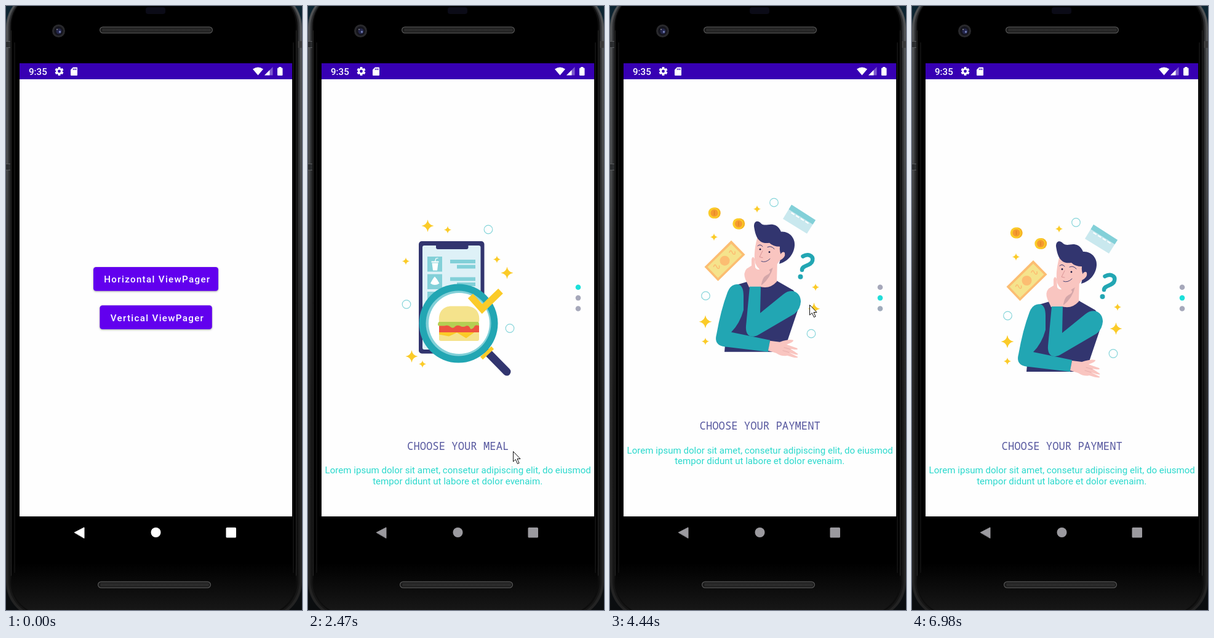
Recreate the animation shown at these times as an HTML page with a canvas. Size 481x981 px, loop 7.64 s.

```html
<!DOCTYPE html>
<html lang="en">
<head>
<meta charset="utf-8">
<title>ViewPager demo</title>
<style>
html, body { margin: 0; width: 100%; height: 100%; overflow: hidden; background: #000; }
canvas { display: block; }
</style>
</head>
<body>
<canvas id="stage" width="481" height="981"></canvas>
<script>
const ctx = document.getElementById('stage').getContext('2d');
const LOOP = 7640, PAGE = 710, OPEN = 1636, OPEN_MS = 425;
const NAVY = '#32356f', INK = '#1b1741', TEAL = '#22a6b3', AQUA = '#82d0d8', ICE = '#c6e6ec',
  GOLD = '#fbcb28', ORANGE = '#f59a2f', CREAM = '#f5e38c', SKIN = '#f9c5c0', PEACH = '#fcbd72';

// drawing helpers
const fill = (c, d) => { ctx.fillStyle = c; ctx.fill(new Path2D(d)); };
const line = (c, w, d, cap = 'round') => {
  ctx.strokeStyle = c; ctx.lineWidth = w; ctx.lineCap = cap;
  ctx.lineJoin = cap === 'round' ? 'round' : 'miter';
  ctx.stroke(new Path2D(d));
};
const rect = (c, x, y, w, h, r = 0) => {
  ctx.fillStyle = c; ctx.beginPath(); ctx.roundRect(x, y, w, h, r); ctx.fill();
};
const disc = (c, x, y, rx, ry = rx) => {
  ctx.fillStyle = c; ctx.beginPath(); ctx.ellipse(x, y, rx, ry, 0, 0, 7); ctx.fill();
};
const ring = (x, y) => {
  ctx.strokeStyle = '#86d5da'; ctx.lineWidth = 1.2;
  ctx.beginPath(); ctx.arc(x, y, 6.8, 0, 7); ctx.stroke();
};
const star = (x, y, r = 6) => {
  const k = r * 0.14;
  fill(GOLD, `M${x} ${y - r}Q${x + k} ${y - k} ${x + r} ${y}Q${x + k} ${y + k} ${x} ${y + r}` +
    `Q${x - k} ${y + k} ${x - r} ${y}Q${x - k} ${y - k} ${x} ${y - r}Z`);
};
const text = (s, x, y, font, c, align = 'center', gap = 0) => {
  ctx.font = font; ctx.fillStyle = c; ctx.textAlign = align;
  ctx.letterSpacing = gap + 'px';
  ctx.fillText(s, x, y);
  ctx.letterSpacing = '0px';
};
const shade = (y0, y1, ...colors) => {
  const g = ctx.createLinearGradient(0, y0, 0, y1);
  colors.forEach((c, i) => g.addColorStop(i / (colors.length - 1), c));
  return g;
};
const layer = (dy, fn) => { ctx.save(); ctx.translate(0, dy); fn(); ctx.restore(); };
const clip = (x, y, w, h) => { ctx.beginPath(); ctx.rect(x, y, w, h); ctx.clip(); };

// timing helpers
const clamp = v => Math.min(1, Math.max(0, v));
const bez = (a, b, c, d, u) => {
  const v = 1 - u;
  return v * v * v * a + 3 * v * v * u * b + 3 * v * u * u * c + u * u * u * d;
};
const curve = (xs, ys, x) => {
  let lo = 0, hi = 1;
  for (let i = 0; i < 24; i++) {
    const m = (lo + hi) / 2;
    if (bez(...xs, m) < x) lo = m; else hi = m;
  }
  return bez(...ys, lo);
};
const fastOut = x => curve([0, .4, .2, 1], [0, 0, 1, 1], x);
const extraSlow = x => x < 1 / 6
  ? curve([0, .05, .13333, .16667], [0, 0, .06, .4], x)
  : curve([.16667, .20833, .25, 1], [.4, .82, 1, 1], x);

const POINTER = [
  [70, 419, 964], [300, 345, 800], [560, 264, 590], [770, 242, 541], [1050, 242, 507],
  [1190, 242, 507], [1480, 350, 598], [1790, 414, 669], [1930, 410, 684], [2260, 350, 720],
  [2560, 326, 724], [2720, 314, 600], [2860, 312, 582], [3280, 312, 582], [3420, 292, 400],
  [3550, 289, 395], [4020, 305, 380], [4100, 308, 380], [4274, 322, 475], [4440, 324, 485],
  [4860, 316, 491], [4910, 315, 491], [5020, 312, 625], [5180, 312, 633], [5520, 312, 633],
  [5720, 326, 491], [5860, 332, 500], [6270, 351, 750], [6330, 351, 754], [6600, 378, 840],
  [6920, 415, 938]
];
function pointerAt(t) {
  const i = POINTER.findIndex(k => k[0] > t);
  if (i < 1) return null;
  const [t0, x0, y0] = POINTER[i - 1], [t1, x1, y1] = POINTER[i];
  const u = (t - t0) / (t1 - t0);
  return [x0 + (x1 - x0) * u, y0 + (y1 - y0) * u];
}

// press, release, settle time, then page before, at release and after
const SWIPES = [
  [2560, 2720, 377, 0, .2, 1], [3280, 3420, 377, 1, 1.25, 2], [4100, 4274, 377, 2, 1.85, 1],
  [4910, 5020, 300, 1, .8, 0], [5520, 5720, 377, 0, .2, 1]
];
function pageAt(t) {
  let pos = 0;
  for (const [press, release, ms, from, mid, to] of SWIPES) {
    if (t < press) break;
    pos = t < release
      ? from + (mid - from) * (t - press) / (release - press)
      : to + (mid - to) * (1 - clamp((t - release) / ms)) ** 5;
  }
  return pos;
}

function phoneBody() {
  rect(shade(0, 981, '#0c2431', '#0a1c27', '#0b0d0f'), 0, 0, 481, 981);
  rect(shade(0, 981, '#505254', '#47494b', '#2a2a2a', '#232323', '#232323'), 0, -25, 481, 1020, 60);
  rect(shade(0, 981, '#2c2d2f', '#2a2b2c', '#181818', '#161616'), 4, -24, 473, 1016, 58);
  rect('#0d0d0d', 7, -23, 467, 1013, 56);
  for (const y of [57, 256]) {
    rect('#5b5d5f', 0, y, 7, 11);
    rect('#2b2d2f', 0, y + 1, 7, 9);
  }
  rect('#3a3a3a', 474, 57, 7, 11);
  rect(shade(905, 981, '#000', '#171717'), 9, -22, 462, 1010, 54);
  line('#2a2a2a', 1, 'M8.5 40V925M471.5 40V925');
  line('#101010', 2, 'M14 60V920M467 60V920');

  rect('#0b0b17', 227, 2, 32, 11, 4);
  disc('#29292c', 85.5, 40.5, 10.5);
  disc('#15151d', 85.5, 40.5, 7.5);
  disc('#24264a', 86, 41, 4.5);
  disc('#7580b8', 87.5, 42, 1.7);
  disc('#8b8b95', 83, 38, 1);
  for (const [x, y] of [[152, 33.5], [149, 934.5]]) {
    rect('#565656', x, y, 184, 11, 5.5);
    rect('#1c1c1c', x + 1.2, y + 1.2, 181.6, 8.6, 4.3);
    ctx.fillStyle = '#393939';
    for (let i = 5; i < 180; i += 2) ctx.fillRect(x + i, y + 3, 1, 5);
  }
}

function statusIcons() {
  const w = '#fff';
  text('9:35', 37, 112, '500 15.1px Roboto, sans-serif', w, 'left');
  ctx.save();
  ctx.translate(86.5, 106);
  disc(w, 0, 0, 5.2);
  for (let i = 0; i < 6; i++) { ctx.rotate(Math.PI / 3); rect(w, -1.9, -7, 3.8, 4, .5); }
  disc('#3700b3', 0, 0, 2.4);
  ctx.restore();
  fill(w, 'M109 99.5H115Q116 99.5 116 100.5V112Q116 113 115 113H106Q105 113 105 112V103.5Z');
  line('#3700b3', 1.2, 'M109.5 101.5V104M111.7 101.5V104M113.8 101.5V104', 'butt');
  fill(w, 'M401 102.5Q409.5 96.5 418 102.5L409.5 112.5Z');
  fill('rgba(255,255,255,.35)', 'M420 112.5L433.5 99V112.5Z');
  fill(w, 'M420 112.5L428.5 104V112.5Z');
  rect(w, 441, 100.5, 8.5, 12.5, 1.2);
  rect(w, 443.3, 99, 4, 2);
}

function navIcons(t) {
  const k = clamp((t - 1700) / 340);
  const c = `rgb(${255 - 100 * k},${255 - 101 * k},${255 - 96 * k})`;
  fill(c, 'M111.5 855L127 847V864Z');
  line(c, 1, 'M111.5 855L127 847V864Z');
  disc(c, 243.5, 855, 8);
  rect(c, 357.5, 847, 16.5, 16.5, 1.5);
}

function windowBase() {
  rect('#000', 22, 93, 443, 788);
  rect('#3700b3', 22, 93, 443, 26);
  rect('#fefefe', 22, 119, 443, PAGE);
}

function button(label, x, y, w) {
  ctx.save();
  ctx.shadowColor = 'rgba(0,0,0,.35)';
  ctx.shadowBlur = 3;
  ctx.shadowOffsetY = 1;
  rect('#6200ee', x, y, w, 38.8, 4.3);
  ctx.restore();
  text(label, x + 17.3, y + 25.3, '500 15.08px Roboto, sans-serif', '#fff', 'left', 1.345);
}

function home() {
  windowBase();
  button('Horizontal ViewPager', 142, 424, 203);
  button('Vertical ViewPager', 152.4, 486.3, 182.4);
}

function caption(title) {
  text(title, 243.7, 720.8, '17.23px "Noto Sans Mono", "DejaVu Sans Mono", monospace', '#57589f');
  const font = '15.08px Roboto, sans-serif', c = '#2bd9cd';
  text('Lorem ipsum dolor sit amet, consetur adipiscing elit, do eiusmod', 243.7, 759, font, c);
  text('tempor didunt ut labore et dolor evenaim.', 243.2, 776.7, font, c);
}

function meal() {
  for (const s of [[194.5, 372.5, 10], [227, 379], [307, 427], [323.5, 449, 10], [159, 430],
    [168.5, 584.5, 10], [186, 597]]) star(...s);
  ring(293, 378.5); ring(160, 500); ring(328, 539);

  rect(NAVY, 180, 397.5, 106.5, 182.5, 5);
  rect('#def1f7', 186, 404.5, 94.5, 169, 3);
  rect(NAVY, 208, 402, 52.5, 8.5, 3);
  for (const y of [422.5, 451, 479.5]) {
    rect(AQUA, 194, y, 24, 24.5);
    rect(AQUA, 231, y + 5, 41, 6);
    rect(AQUA, 242, y + 13.5, 30, 6);
  }
  fill('#fff', 'M201.5 433H211.5L210 445H203ZM200.5 430H212.5V432H200.5Z');
  line('#fff', 1.2, 'M206.5 430L208 425.5L211 425');
  fill('#fff', 'M199 466Q203 458 206 455Q210 459 213.5 466Q206 471 199 466Z');

  line(TEAL, 8, 'M284 571L293 580', 'butt');
  line(NAVY, 13, 'M293 579L323 609.5');
  line(GOLD, 6, 'M282 587.5L300 570.5', 'butt');
  disc(TEAL, 244.5, 531, 64);
  disc(AQUA, 244.5, 531, 53);
  disc('#fff', 245.5, 531, 49.5);

  rect(CREAM, 213, 544, 65, 15.5, 3);
  fill(GOLD, 'M213 545H271L257 555L242 546L229 552L213 549Z');
  fill('#ee5340', 'M213 533H278V545.5H213Z');
  fill('#b5cf53', 'M211 533Q211 528 215 528H275Q278 528 278 533V535Q274 533 271 535' +
    'Q268 541 264 540Q262 534 257 535Q252 538 247 535Q242 533 239 536Q236 540 232 537' +
    'Q228 533 222 535H213Q211 535 211 533Z');
  fill(CREAM, 'M213 528.5C211 511 221 503 233 503H257C271 503 280 512 278 528.5Z');
  line(GOLD, 11, 'M264 486.5L283 507.5L313 478.5', 'butt');
}

function coin(x, y) {
  disc('#f5b324', x + 1.5, y, 8.7, 9);
  disc(GOLD, x - 1, y, 8.7, 9);
  disc(ORANGE, x, y, 6);
  line('#dd8422', 1.2, `M${x} ${y - 3}V${y + 3}`);
}

function payment() {
  for (const s of [[239, 362], [169, 407.5], [155, 545, 10.5], [155, 577], [334, 489],
    [331.5, 524, 10]]) star(...s);
  ring(266.5, 351.5); ring(155.5, 503); ring(327, 564.5);
  coin(169.5, 368.5); coin(209, 386);

  fill('#c9e8ee', 'M295 355L334 380L320 402L281 378Z');
  fill(AQUA, 'M295 355L334 380L329.5 387L290.5 362.5Z');
  ctx.setLineDash([6, 3]);
  line('#fff', 2, 'M294.5 368L325 387', 'butt');
  ctx.setLineDash([]);

  fill(PEACH, 'M153.5 456L197 413L219.5 436L175.5 479Z');
  fill(CREAM, 'M158.5 456L197 418.5L214.5 436L175.5 474Z');
  disc(PEACH, 186.5, 446, 8);
  for (const [x, y] of [[198, 434.5], [172.5, 457.5]])
    line(PEACH, 1.6, `M${x - 4} ${y - 2}q2 -5 4 -1t3 4q3 1 2 -4`);

  line(TEAL, 6.5, 'M313.5 439C322 434 331 438 329 446C327 455 312 453 312 461');
  disc(TEAL, 309.5, 472, 4);

  // body, neck and head
  fill(NAVY, 'M203 486L230 478H270L298 494L310 512L288 577L264 594H186L189 560L214 520Z');
  fill(SKIN, 'M243 455L272 440L271 480Q258 494 241 487Z');
  fill('#d3a6a9', 'M246 486Q246 469 265 456Q261 474 246 486Z');
  fill(SKIN, 'M241 402Q232 433 236 450Q242 465 257 461Q269 457 277 444Q284 437 283 429L274 405Z');
  fill(NAVY, 'M234 390C234 381 241 380 246 386C253 391 260 384 270 389Q275 392 278 399' +
    'C292 398 301 410 300 421C299 437 287 448 275 451Q276 444 279 439Q275 431 276 423' +
    'Q265 423 259 417C240 420 236 404 234 390Z');
  fill(SKIN, 'M276 438Q280 429 284 433Q286 441 275 446Z');
  disc(INK, 244, 427.5, 1.4); disc(INK, 259, 432, 1.4);
  line(NAVY, 1, 'M240 422Q244 418 248 423M256 424Q262 421 267 427');
  line('#d58f91', .9, 'M248 430L243 440L248 441');
  line(NAVY, .9, 'M246 447Q253 450 260 443');

  // raised hand and arms
  fill(SKIN, 'M230 444Q232 437 235 443L236 457Q239 462 247 460L258 461Q263 464 257 468' +
    'Q250 471 248 477L244 489H226L220 476Q216 466 222 459L230 454Z');
  fill(TEAL, 'M227 488H245L244 531L281 501C294 490 309 496 310 511Q310 524 300 532L240 567' +
    'C226 573 220 565 221 552Z');
  fill(TEAL, 'M202 485C213 482 217 490 217 503V526Q211 548 197 562L260 575L257 594L190 586' +
    'C174 585 170 577 173 566Q180 526 191 497Q195 487 202 485Z');
  fill(SKIN, 'M260 576L276 578Q290 573 298 575Q299 578 287 582L304 588Q308 592 293 589' +
    'L305 597Q308 601 291 595L305 602Q306 606 288 600Q279 602 270 596L257 592Z');
  line('#e3a9a8', .8, 'M283 587L293 590M281 592L291 595');
}

// four bumps on a flat base; a negative width mirrors the cloud
function cloud(x, y, w, h) {
  ctx.fillStyle = ICE;
  for (const [cx, rx, ry] of [[.17, .17, .45], [.4, .21, 1], [.62, .15, .5], [.81, .19, .65]]) {
    ctx.beginPath();
    ctx.ellipse(x + w * cx, y, Math.abs(w) * rx, h * ry, 0, Math.PI, 2 * Math.PI);
    ctx.fill();
  }
}

function wheel(x) {
  disc(INK, x, 634, 27.5);
  disc(TEAL, x, 635, 13);
  disc(AQUA, x, 635, 6);
}

function delivery() {
  cloud(184, 438, 106, 24); cloud(148, 487, 53, 14);
  cloud(342, 472, -76, 17); cloud(264, 511, -37, 9);
  ring(232, 466); ring(330, 494); ring(151.5, 540);
  for (const s of [[162, 448], [311, 438], [191, 507, 10], [208, 520], [155, 585], [221, 615],
    [331.5, 565]]) star(...s);
  line('#dceff2', .8, 'M203 584H218M202 590H218M202 596H217M205 581V602M210 581V602M215 581V602');

  // scooter
  wheel(174.5); wheel(295.5);
  fill(TEAL, 'M196 556L212 566Q201 595 217 630Q222 640 232 641H255L270 620V648H206Q201 600 196 556Z');
  fill(AQUA, 'M196 545Q211 542 220 551Q228 558 223 561Q205 567 200 583Q195 610 207 648' +
    'Q194 640 196 610Q197 590 194 560Z');
  fill(AQUA, 'M146 634C148 617 159 608 176 608Q200 609 203 634Z');
  line(NAVY, 3, 'M147 634H200');
  fill(TEAL, 'M264 588H302L298 598Q264 603 262 634H248Q247 604 264 588Z');
  fill(AQUA, 'M253 634C254 604 267 592 290 592H316Q326 610 327 634Z');
  line(NAVY, 3, 'M255 634.5H325');
  line(NAVY, 2.5, 'M303 628H321');
  rect(NAVY, 204, 645, 64, 5, 2);
  rect(GOLD, 321, 596, 7, 15, 3);
  rect(NAVY, 321, 596, 3, 18, 1);
  rect(ORANGE, 262, 579.5, 38, 13, 2);
  rect(ORANGE, 297, 586, 29, 10, 1);
  rect(NAVY, 190, 543, 6, 22, 3);
  rect('#d99a3c', 188, 544, 4, 20, 2);
  line(GOLD, 6, 'M206 548L216 552');
  disc(NAVY, 213, 555, 4.5);
  disc(AQUA, 213, 555, 2);

  // rider
  fill(INK, 'M264 565H290Q292 583 277 588L248 600L252 645H242Q235 618 232 600Q231 591 243 585Z');
  line(INK, 4, 'M239 646H251');
  fill(ORANGE, 'M264 522Q270 511 286 514L290 566H266Q268 545 264 522Z');
  disc(SKIN, 221, 552, 7, 5);
  line(INK, 10, 'M277 525L258 546L232 551');
  fill(SKIN, 'M265 496H284V514H272Q265 510 265 496Z');
  fill(INK, 'M275 494H288V508Q282 513 276 508Z');
  line(TEAL, 2, 'M275 500H287M276 505H286', 'butt');
  fill('#e3f1f4', 'M264 499L276 500V512Q270 517 265 511Z');
  fill(ORANGE, 'M262 494C264 480 286 479 288 495L276 496Z');
  fill(NAVY, 'M260 493Q262 484 273 485Q278 489 277 495Z');
  rect(NAVY, 287, 516.5, 33, 50.5, 3);
  line(INK, 2, 'M288 520V564');
  line('#6d70a3', 1, 'M291 521L302 532M291 562L299 550');
  disc('#fff', 304, 541.5, 9.5);
  fill(ORANGE, 'M306 533L298.5 543H303L301 550L309.5 540H304.5Z');
}

const PAGES = [
  [meal, -15.5, 'CHOOSE YOUR MEAL'],
  [payment, 0, 'CHOOSE YOUR PAYMENT'],
  [delivery, -64, 'FAST DELIVERY']
];

function pager(pos) {
  windowBase();
  ctx.save();
  clip(22, 119, 443, PAGE);
  PAGES.forEach(([art, lift, title], i) => {
    if (Math.abs(i - pos) >= 1) return;
    layer((i - pos) * PAGE, () => {
      layer(lift, art);
      caption(title);
    });
  });
  ctx.restore();
  for (let i = 0; i < 3; i++) {
    const k = clamp(1 - Math.abs(i - pos));
    disc(`rgb(${166 - 138 * k},${168 + 56 * k},${186 + 32 * k})`, 439, 456.7 + 17.4 * i, 4.3);
  }
}

function pointer(t) {
  const p = pointerAt(t);
  if (!p) return;
  ctx.save();
  ctx.translate(Math.round(p[0]) + .5, Math.round(p[1]) + .5);
  const d = 'M0 0V16.5L3.8 13L7 20L9.6 18.8L6.5 12H11.5Z';
  fill('#fff', d);
  line('#111', 1, d, 'butt');
  ctx.restore();
}

function draw(t) {
  phoneBody();
  const u = clamp((t - OPEN) / OPEN_MS), move = fastOut(u);
  ctx.save();
  clip(22, 93, 443, 788);
  if (u < 1) {
    layer(-15.7 * move, home);
    rect(`rgba(0,0,0,${.1 * clamp(u * 3.5)})`, 22, 93, 443, 788);
  }
  if (u > 0) {
    layer(32.3 * (1 - move), () => {
      clip(22, 93 + 755 * (1 - extraSlow(u)), 443, 788);
      pager(pageAt(t));
    });
  }
  ctx.restore();
  statusIcons();
  navIcons(t);
  pointer(t);
}

const start = performance.now();
function tick() {
  draw((performance.now() - start) % LOOP);
  requestAnimationFrame(tick);
}
tick();
</script>
</body>
</html>
```
